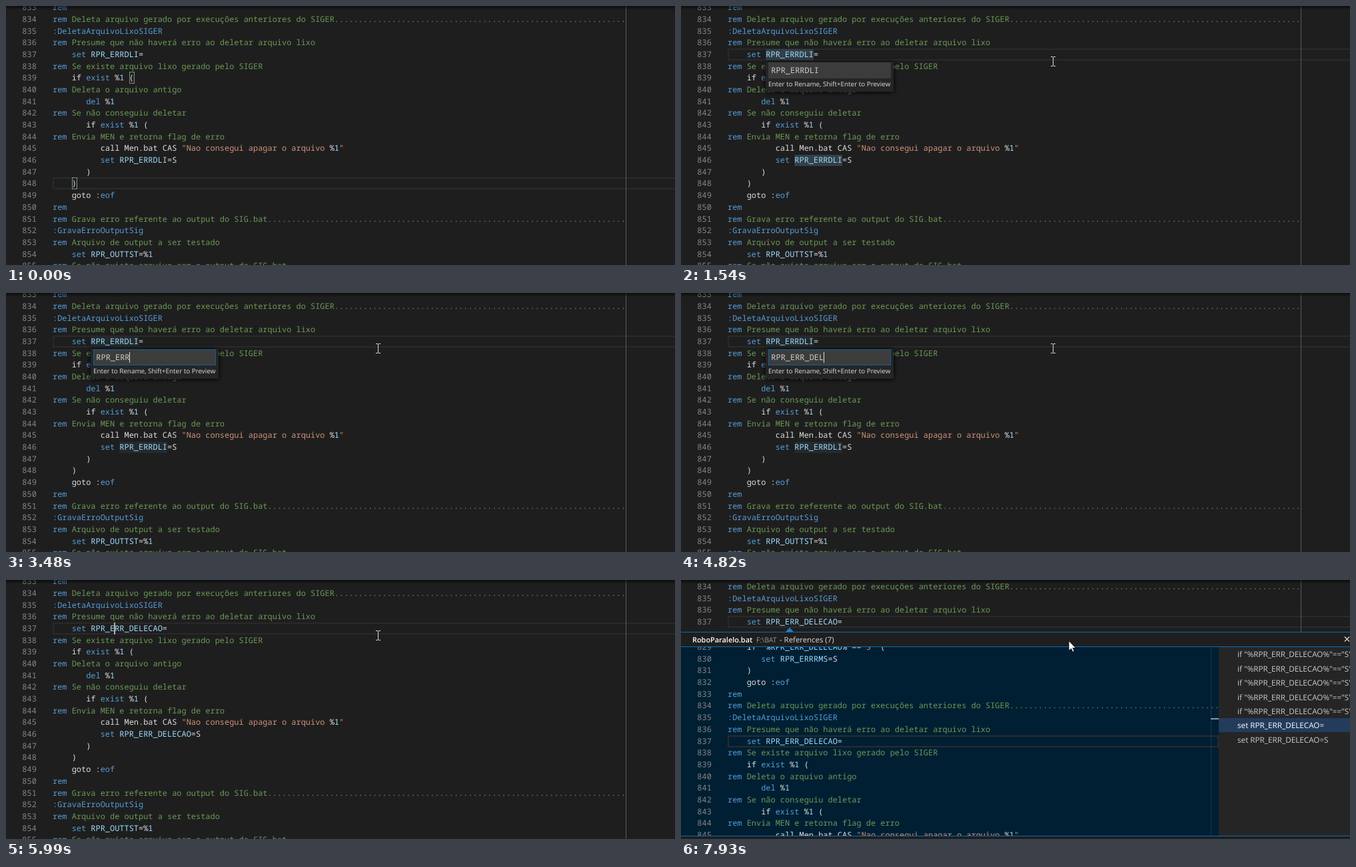
Animation of 1004 by 390 pixels, one loop 8000 ms. Source, as an HTML page with a canvas:

```html
<!DOCTYPE html>
<html lang="en">
<head>
<meta charset="utf-8">
<style>
  html, body { margin: 0; width: 100%; height: 100%; overflow: hidden; background: #1e1e1e; }
  canvas { display: block; }
</style>
</head>
<body>
<canvas id="stage" width="1004" height="390"></canvas>
<script>
const ctx = document.getElementById('stage').getContext('2d');
const W = 1004, H = 390, LOOP = 8000;
const CELL = 7.166, LINE = 17.68, LEFT = 70;
const MONO = '500 11.94px "Noto Sans Mono", monospace';
const sans = (size, weight) => `${weight} ${size}px "Open Sans", sans-serif`;
const BLUE = '#569cd6', GREEN = '#6a9955', VAR = '#9cdcfe', PLAIN = '#dcdcdc', STRING = '#ce9178';
const OLD_NAME = 'RPR_ERRDLI', NEW_NAME = 'RPR_ERR_DELECAO';

const FIRST = 829;
const CODE = [
  '    if "%@%"=="S" (',
  '       set RPR_ERRRMS=S',
  '    )',
  '    goto :eof',
  'rem',
  'rem Deleta arquivo gerado por execuções anteriores do SIGER'.padEnd(120, '.'),
  ':DeletaArquivoLixoSIGER',
  'rem Presume que não haverá erro ao deletar arquivo lixo',
  '    set @=',
  'rem Se existe arquivo lixo gerado pelo SIGER',
  '    if exist %1 (',
  'rem Deleta o arquivo antigo',
  '       del %1',
  'rem Se não conseguiu deletar',
  '       if exist %1 (',
  'rem Envia MEN e retorna flag de erro',
  '          call Men.bat CAS "Nao consegui apagar o arquivo %1"',
  '          set @=S',
  '       )',
  '    )',
  '    goto :eof',
  'rem',
  'rem Grava erro referente ao output do SIG.bat'.padEnd(120, '.'),
  ':GravaErroOutputSig',
  'rem Arquivo de output a ser testado',
  '    set RPR_OUTTST=%1',
  'rem Se não existe arquivo com o output do SIG.bat'
];

const baseline = (n, dy = 0) => Math.round(77 + LINE * (n - 837) + dy);
const column = c => LEFT + c * CELL;

function rect(x, y, w, h, color) {
  ctx.fillStyle = color;
  ctx.fillRect(x, y, w, h);
}

function frame(x, y, w, h, color, width = 1) {
  ctx.strokeStyle = color;
  ctx.lineWidth = width;
  ctx.strokeRect(x + width / 2, y + width / 2, w - width, h - width);
}

function label(text, x, y, size, color, weight = 400) {
  ctx.font = sans(size, weight);
  ctx.fillStyle = color;
  ctx.fillText(text, x, y);
}

// Monospaced text, one glyph per cell
function mono(text, x, y, color) {
  ctx.font = MONO;
  ctx.fillStyle = color;
  [...text].forEach((ch, i) => ch !== ' ' && ctx.fillText(ch, x + i * CELL, y));
}

function codeLine(text, y) {
  if (text.startsWith('rem')) {
    mono('rem', LEFT, y, BLUE);
    mono(text.slice(3), column(3), y, GREEN);
    return;
  }
  if (text.startsWith(':')) return mono(text, LEFT, y, BLUE);
  let quoted = false;
  for (const { 0: token, index } of text.matchAll(/RPR_\w+|\w+|\S/g)) {
    let color = quoted ? STRING : PLAIN;
    if (token === '"') {
      quoted = !quoted;
      color = STRING;
    } else if (/^(RPR_|\d)/.test(token)) color = VAR;
    else if (token === '%') color = PLAIN;
    else if (/^(set|del|exist|eof)$/.test(token)) color = BLUE;
    mono(token, column(index), y, color);
  }
}

function lines(from, to, dy, name) {
  for (let n = from; n <= to; n++) {
    const y = baseline(n, dy);
    mono(String(n), 24.3, y, '#858585');
    codeLine(CODE[n - FIRST].replace('@', name), y);
  }
}

function topShadow() {
  const shade = ctx.createLinearGradient(0, 0, 0, 6);
  shade.addColorStop(0, 'rgba(0,0,0,.6)');
  shade.addColorStop(1, 'rgba(0,0,0,0)');
  rect(0, 0, W, 6, shade);
}

function editor(t) {
  const clicked = t >= 930;
  const name = t < 5990 ? OLD_NAME : NEW_NAME;
  frame(LEFT, baseline(clicked ? 837 : 848) - 13, W, 18, '#2a2a2a', 2);
  if (!clicked) {
    for (const [n, col] of [[839, 16], [848, 4]]) {
      const x = Math.round(column(col)), y = baseline(n) - 13;
      rect(x, y, 8, 18, '#1b251b');
      frame(x, y, 8, 18, '#888');
    }
  }
  if (t >= 1240 && t < 5990) {
    const color = t < 1690 ? '#343f48' : '#252a2d';
    for (const [n, col] of [[837, 8], [846, 14]])
      rect(column(col), baseline(n) - 12, CELL * 10, 17, color);
  }
  rect(930, 0, 1, H, '#5a5a5a');
  lines(833, 855, 0, name);
  const caretOn = (t >= 930 && t < 1470) || (t >= 5990 && t < 6450) || (t >= 6930 && t < 7470);
  if (caretOn) rect(162, 64, 2, 18, '#aeafad');
  topShadow();
}

const KEYS_DELETE = [2790, 2940, 3090];
const KEYS_TYPE = [4040, 4510, 4660, 4820, 4890, 5050, 5120, 5290];

function inputText(t) {
  const pressed = keys => keys.filter(k => t >= k).length;
  const typed = pressed(KEYS_TYPE);
  return typed ? NEW_NAME.slice(0, 7 + typed) : OLD_NAME.slice(0, 10 - pressed(KEYS_DELETE));
}

function renameBox(t) {
  const focused = t >= 1690, x = 135.3;
  ctx.save();
  ctx.shadowColor = '#000';
  ctx.shadowBlur = 8;
  ctx.shadowOffsetY = 1;
  rect(127, 84, 192, 45, '#252526');
  ctx.restore();
  rect(131, 85, 184, 24, '#3c3c3c');
  if (focused) frame(131, 85, 184, 24, '#0f6296');
  if (focused && t < 2480) rect(x, 89, CELL * 10, 17, '#264f78');
  const text = inputText(t);
  mono(text, x, 101, '#ccc');
  const caretOn = (t >= 2480 && t < 2940) || (t >= 3480 && t < 5840);
  if (caretOn) rect(Math.round(x + text.length * CELL), 89, 1, 16, '#ddd');
  label('Enter to Rename, Shift+Enter to Preview', 131, 121, 9.88, '#ddd');
}

function peek() {
  const edge = '#0f6ab0';
  frame(LEFT, 54, W, 18, '#2a2a2a', 2);
  rect(930, 0, 1, 78, '#5a5a5a');
  lines(834, 837, -10, NEW_NAME);
  topShadow();

  rect(0, 78, W, 23, '#1e1e1e');
  rect(0, 78, W, 1, edge);
  ctx.fillStyle = '#1b7ccc';
  ctx.fill(new Path2D('M157 78L163 71.5L169 78Z'));
  label('RoboParalelo.bat', 17, 94, 10.9, '#fff', 600);
  label('F:\\BAT', 113, 94, 10.6, '#9a9a9a');
  label('- References (7)', 148, 94, 11.4, '#ddd');
  ctx.strokeStyle = '#ccc';
  ctx.lineWidth = 1.5;
  ctx.stroke(new Path2D('M996 85.5l7 7m0-7l-7 7'));

  ctx.save();
  ctx.beginPath();
  ctx.rect(0, 100, 807, 285);
  ctx.clip();
  rect(0, 100, 807, 285, '#001f33');
  frame(LEFT, 234, 737, 18, '#2b2b2d', 2);
  rect(795, 100, 1, 285, '#16364a');
  lines(829, 845, 169.5, NEW_NAME);
  rect(795, 208, 12, 2, '#8c98a0');
  ctx.restore();

  rect(807, 100, 197, 285, '#252526');
  rect(807, 208, 197, 21, '#233c5c');
  for (let i = 0; i < 7; i++) {
    const text = i < 5 ? `if "%${NEW_NAME}%"=="S" (` : `set ${NEW_NAME}=${i > 5 ? 'S' : ''}`;
    label(text, 835, Math.round(116.4 + i * 21.38), 11.7, i === 5 ? '#fff' : '#ccc');
  }
  rect(0, 100, W, 1, edge);
  rect(0, 385, W, 1, edge);
  rect(0, 386, W, 4, '#1e1e1e');
}

// Pointer path: time, x, y
const PATH = [
  [70, 619, 294], [380, 300, 120], [540, 152, 20], [690, 163, 62], [850, 163, 62],
  [930, 163, 70], [1080, 163, 73], [1460, 558, 83], [6850, 558, 83], [7000, 583, 91]
];

function pointerAt(t) {
  const next = PATH.findIndex(p => p[0] > t);
  if (next < 0) return PATH.at(-1).slice(1);
  const [t0, x0, y0] = PATH[next - 1], [t1, x1, y1] = PATH[next];
  const k = (t - t0) / (t1 - t0);
  return [Math.round(x0 + (x1 - x0) * k), Math.round(y0 + (y1 - y0) * k)];
}

function textPointer(t) {
  const sampled = Math.floor((t + 7) / 77) * 77;
  if (sampled < 77) return;
  const [x, y] = pointerAt(sampled);
  rect(x, y - 6, 1, 13, '#ddd');
  for (const dy of [-7, 7]) {
    rect(x - 3, y + dy, 3, 1, '#ddd');
    rect(x + 1, y + dy, 3, 1, '#ddd');
  }
}

function arrowPointer() {
  const arrow = new Path2D('M582 91.5v15l3.4-3.2 2.5 5 2.3-1-2.4-4.9h4.6z');
  ctx.fillStyle = '#fff';
  ctx.strokeStyle = '#000';
  ctx.lineWidth = 0.8;
  ctx.fill(arrow);
  ctx.stroke(arrow);
}

function draw(t) {
  ctx.textRendering = 'geometricPrecision';
  rect(0, 0, W, H, '#1e1e1e');
  if (t >= 7930) {
    peek();
    arrowPointer();
    return;
  }
  editor(t);
  if (t >= 1470 && t < 5990) renameBox(t);
  textPointer(t);
}

const start = performance.now();
function tick() {
  draw((performance.now() - start) % LOOP);
  requestAnimationFrame(tick);
}
tick();
</script>
</body>
</html>
```
